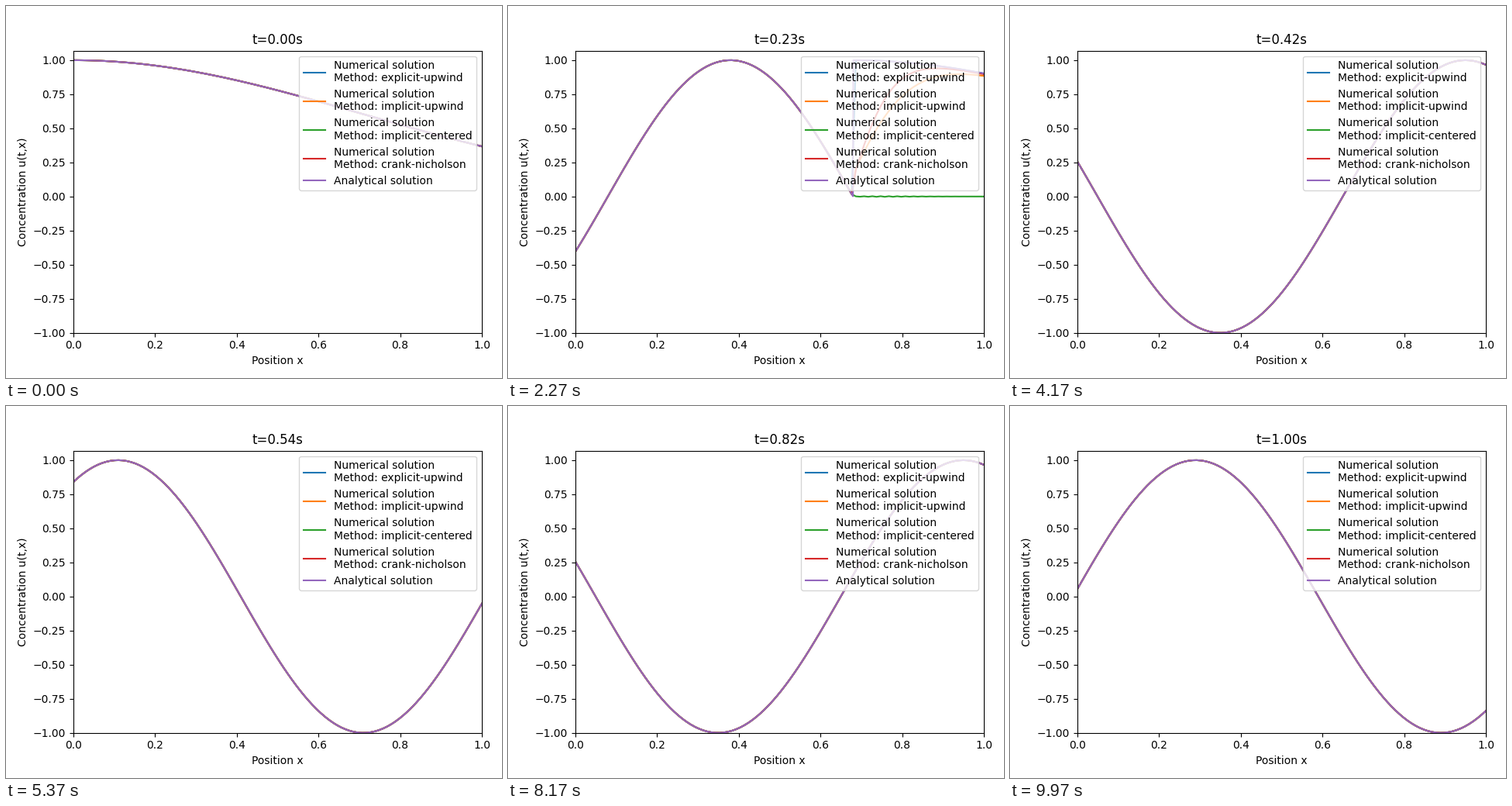
A matplotlib script that plays this animation: 640x480 px, repeating every 10000 ms.

```python
import numpy as np
import matplotlib.pyplot as plt
from matplotlib.animation import FuncAnimation

SPEED = 3.0
CELLS = 100
FRAMES = 300
LOOP_MS = 10000
METHODS = ["explicit-upwind", "implicit-upwind", "implicit-centered", "crank-nicholson"]

x = np.linspace(0, 1, CELLS)
x_fine = np.linspace(0, 1, 1000)
dt = 1 / FRAMES
courant = SPEED * dt / (x[1] - x[0])


def exact(pos, t):
    """Inflow wave behind the front, shifted initial profile ahead of it."""
    shift = pos - SPEED * t
    return np.where(shift < 0, np.sin(-5 * np.pi * shift / SPEED), np.exp(-shift**2))


def step_matrices():
    eye = np.eye(CELLS)
    below = np.eye(CELLS, k=-1)
    above = np.eye(CELLS, k=1)
    upwind = courant * (eye - below)
    centered = courant / 2 * (below - above)
    return [
        eye - upwind,
        np.linalg.inv(eye + upwind),
        np.linalg.inv(eye + centered),
        np.linalg.solve(eye + upwind / 2, eye - upwind / 2),
    ]


def solve(matrix):
    """March in time, imposing the inflow solution behind the front."""
    u = exact(x, 0)
    history = [u]
    for n in range(1, FRAMES):
        t = n * dt
        u = np.where(x < SPEED * t, exact(x, t), matrix @ u)
        history.append(u)
    return history


solutions = [solve(m) for m in step_matrices()]

fig, ax = plt.subplots(figsize=(6.4, 4.8), dpi=100)
lines = [
    ax.plot(x, sol[0], label=f"Numerical solution\nMethod: {name}")[0]
    for name, sol in zip(METHODS, solutions)
]
(exact_line,) = ax.plot(x_fine, exact(x_fine, 0), label="Analytical solution")
ax.set_xlim(0, 1)
ax.set_ylim(-1, 1.07)
ax.set_xlabel("Position x")
ax.set_ylabel("Concentration u(t,x)")
ax.legend(loc="upper right")
title = ax.set_title("t=0.00s")
fig.tight_layout()
fig.subplots_adjust(top=0.88)


def update(n):
    t = n * dt
    for line, sol in zip(lines, solutions):
        line.set_ydata(sol[n])
    exact_line.set_ydata(exact(x_fine, t))
    title.set_text(f"t={t:.2f}s")
    return [*lines, exact_line, title]


anim = FuncAnimation(fig, update, frames=FRAMES, interval=LOOP_MS / FRAMES, repeat=True)
plt.show()
```
